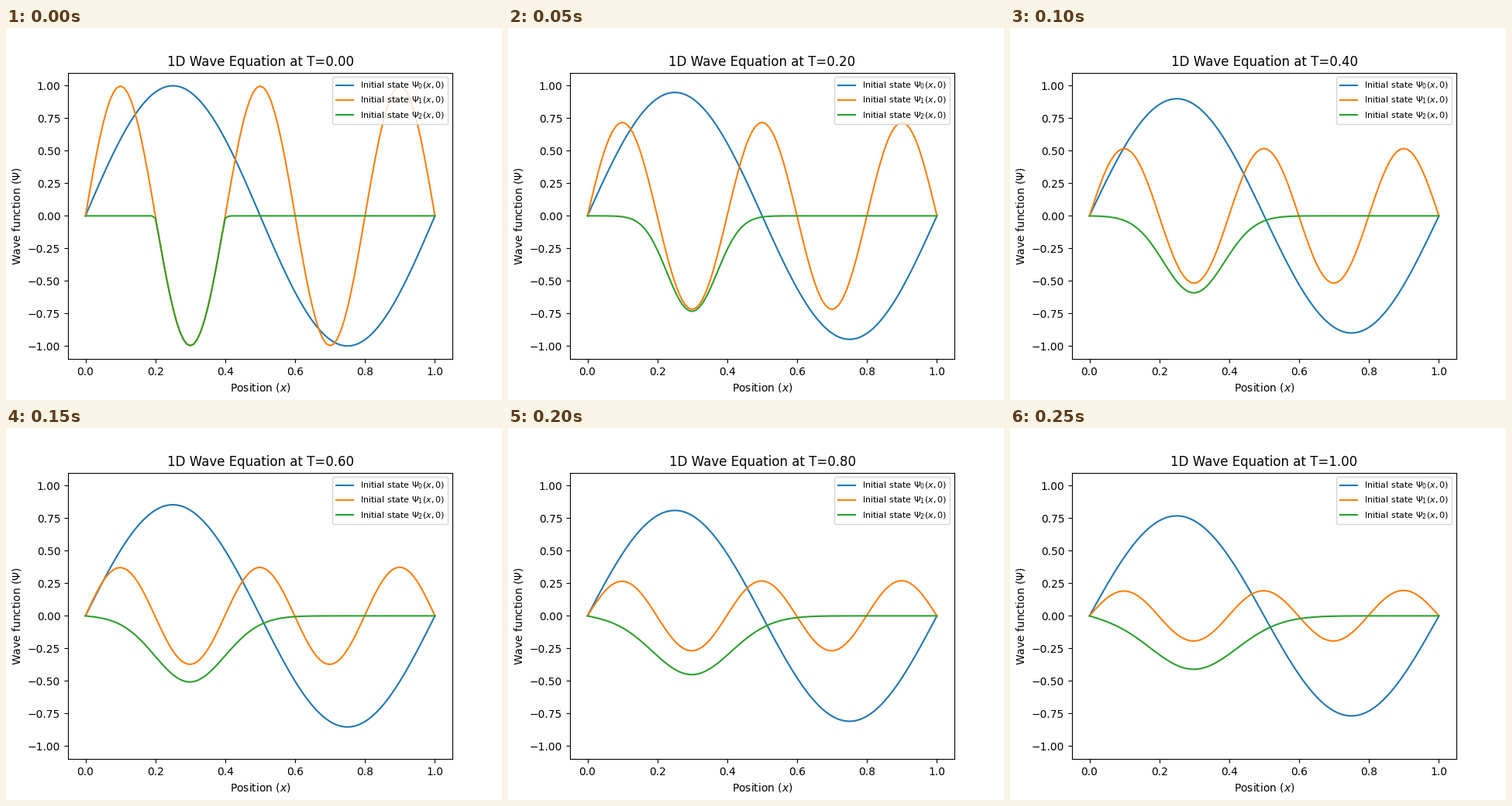
A matplotlib script that plays this animation: 640 by 480 pixels, repeating every 300 ms.

```python
import numpy as np
import matplotlib.pyplot as plt
from matplotlib.animation import FuncAnimation

FRAMES, INTERVAL = 6, 50
STEPS_PER_FRAME = 100
RATE = 2 / 17  # diffusion number of one time step

x = np.linspace(0, 1, 101)


def initial_states():
    slow = np.sin(2 * np.pi * x)
    fast = np.sin(5 * np.pi * x)
    pulse = np.where((x > 0.195) & (x < 0.405), fast, 0)
    return np.array([slow, fast, pulse])


def step(psi):
    """Sweep left to right in place, with both ends held fixed."""
    for i in range(1, len(x) - 1):
        psi[:, i] += RATE * (psi[:, i + 1] - 2 * psi[:, i] + psi[:, i - 1])


def simulate():
    psi = initial_states()
    step(psi)
    history = [psi.copy()]
    for _ in range(FRAMES - 1):
        for _ in range(STEPS_PER_FRAME):
            step(psi)
        history.append(psi.copy())
    return history


history = simulate()

fig, ax = plt.subplots(figsize=(6.4, 4.8), dpi=100)
lines = [
    ax.plot(x, state, label=rf"Initial state $\Psi_{k}(x,0)$")[0]
    for k, state in enumerate(history[0])
]
ax.set_ylim(-1.1, 1.1)
ax.set_xlabel("Position ($x$)")
ax.set_ylabel(r"Wave function ($\Psi$)")
ax.legend(loc="upper right", fontsize=8)
title = ax.set_title("")


def update(frame):
    for line, state in zip(lines, history[frame]):
        line.set_ydata(state)
    title.set_text(f"1D Wave Equation at T={frame / (FRAMES - 1):.2f}")
    return [*lines, title]


anim = FuncAnimation(fig, update, frames=FRAMES, interval=INTERVAL, repeat=True)
plt.show()
```
